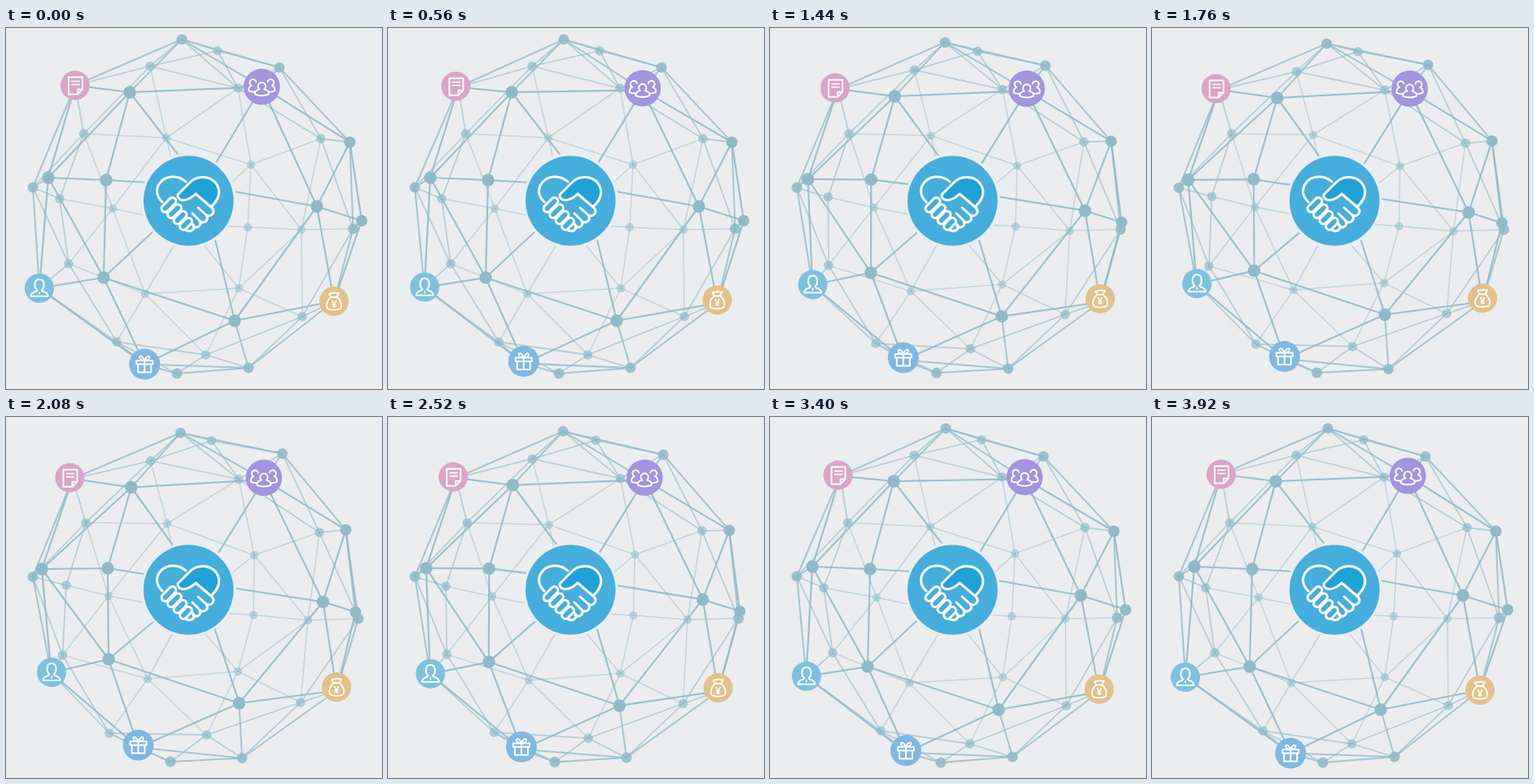
These frames come from a looping animation (462 px wide and 444 px high, 3960 ms). An HTML page with a canvas:

```html
<!DOCTYPE html>
<html lang="en">
<head>
<meta charset="utf-8">
<title>Connected globe</title>
<style>
  html, body { margin: 0; width: 100%; height: 100%; overflow: hidden; background: #ebedef; }
  canvas { display: block; width: 462px; height: 444px; }
</style>
</head>
<body>
<canvas id="stage"></canvas>
<script>
const W = 462, H = 444, STEP = 40, LOOP = 3960;
const BG = '#ebedef', NET = '#8fbac7';
const canvas = document.getElementById('stage');
const ctx = canvas.getContext('2d');
const dpr = window.devicePixelRatio || 1;
canvas.width = W * dpr;
canvas.height = H * dpr;

// Each node: x, y, dx, dy. Layers run from the far side to the near side.
const layers = [
  { depth: .52, r: 5.2, nodes: {
    H: [197, 135, 1, -4], I: [301, 168, 4, 2], P: [131, 222, -5, -2], Q: [297, 245, 7, -1.5],
    R: [363, 248, 8, 2], X: [171, 327, 3, -5], Y: [286, 320, -1, -7], g: [222, 241, -2, -3] } },
  { depth: .68, r: 5.8, nodes: {
    B: [260, 28, -7.5, 1], D: [177, 47, .5, 7], E: [285, 74, 1, 2.5], G: [95.5, 130, 2.5, 0],
    J: [387, 136, -2, 6], O: [66, 210, 8, -3], V: [77, 290, -7.5, 3], a: [364, 355, -2, -4],
    b: [136, 386, -9, 3], c: [245.5, 402, 1, -11] } },
  { depth: .88, r: 6.5, nodes: {
    A: [216, 14, -1.5, 5.5], C: [336, 48.5, 3.5, -3.5], M: [33, 196, 0, .5], U: [426.5, 247, 6.5, 1],
    d: [210, 425, -8, -1], e: [298, 418, -8, 1.5] } },
  { depth: 1, r: 7.7, nodes: {
    F: [152, 79, 2, 7.5], L: [52, 184, -8, 3], N: [123, 187, 2, -1], S: [382, 219.5, 7.5, 7.8],
    W: [120, 307, 6, -9], Z: [281, 360, 5.5, -8], K: [422.5, 140.5, -5, -1.7], T: [437, 237, -7.5, 3],
    h: [241, 194, -3, 10] } }
];
const small = { K: 7, T: 7 };

const edges = (
  'HD HE HI HG HP Hg Ig Pg Qg Xg Yg IE IJ IQ IR RQ RY RU RJ Ra YQ YX Ya Yc Xc Xb XV XP PV PO PG ' +
  'GO GD GM G1 D1 DA DB DE AE BE AB BC EC EJ CJ JK JU OV OM VM Vb V3 bc bd b4 b3 cd ca ce ae Ua a5 ' +
  'AC A1 A2 AF C2 CK M1 M3 ML UK UT U5 de d4 e4 e5 eZ ' +
  'F1 F2 FL FN Fh L1 LN LW L3 NW Nh 2h 2K 2S KS KT ST SZ S5 Sh T5 W3 W4 WZ Wh Z4 Z5 Zh 34'
).split(' ');

// Icons: rest, turning point and end position; shift is how far they drift off their joint.
const icons = {
  1: { r: 18, color: '#dba4c8', path: [[85, 70.5], [83.2, 71.8], [78, 75]], shift: [3.4, 1.3], draw: drawNote },
  2: { r: 22.3, color: '#a294de', path: [[314.3, 72.3], [312.6, 74.4], [317.3, 74.7]], shift: [0, 2.5], draw: drawPeople },
  3: { r: 18, color: '#7dc1e0', path: [[41, 320], [45.7, 318.5], [57, 313.6]], shift: [-.5, .5], draw: drawPerson },
  4: { r: 19, color: '#7fb8e2', path: [[170.3, 413.5], [166.2, 409.5], [162.2, 403]], shift: [.5, 3], draw: drawGift },
  5: { r: 18, color: '#e3c08a', path: [[403, 336], [404.8, 334.4], [406.3, 332]], shift: [0, 4.3], draw: drawBag }
};

const depthOf = {};
layers.forEach(l => Object.keys(l.nodes).forEach(k => depthOf[k] = l.depth));
Object.keys(icons).forEach(k => depthOf[k] = 1);
const edgeDepth = e => Math.min(depthOf[e[0]], depthOf[e[1]]);
edges.sort((p, q) => edgeDepth(p) - edgeDepth(q));

const mix = (p, q, k) => [p[0] + (q[0] - p[0]) * k, p[1] + (q[1] - p[1]) * k];

function disc(x, y, r, color) {
  ctx.fillStyle = color;
  ctx.beginPath();
  ctx.arc(x, y, r, 0, 7);
  ctx.fill();
}

function stroke(d, width = 1.7, color = '#fff') {
  ctx.lineWidth = width;
  ctx.strokeStyle = color;
  ctx.stroke(new Path2D(d));
}

function fill(d, color) {
  ctx.fillStyle = color;
  ctx.fill(new Path2D(d));
}

function drawNote() {
  stroke('M-8-10H9V5L3 11H-8ZM9 5H3V11', 2);
  stroke('M-4-5H5M-4-1H5', 1.7);
}

function drawPeople(color) {
  const side = 'M-7-6A4 4 0 1 0-12.5-1.5C-15.5-.5-16.5 2-16 5C-13.5 6.5-11 6.5-8 6';
  stroke(side, 1.9);
  ctx.save();
  ctx.scale(-1, 1);
  stroke(side, 1.9);
  ctx.restore();
  const body = 'M-3 3C-7 4-9 6-8.5 9C-4 11.5 4 11.5 8.5 9C9 6 7 4 3 3A4.7 4.7 0 1 0-3 3Z';
  fill(body, color);
  stroke(body, 1.9);
}

function drawPerson() {
  stroke('M-2.8 2.5C-7-1-6.5-11 0-11C6.5-11 7-1 2.8 2.5C2.5 5 10.5 3.5 10.5 10H-10.5C-10.5 3.5-2.5 5-2.8 2.5Z', 2);
  stroke('M0 5V7', 1.6);
}

function drawGift() {
  stroke('M-10-4.5H10V0H-10ZM-8 0V10H8V0M0-4.5V10', 2);
  stroke('M0-5C-3-11-7-11-6-7.5C-5-5-3-5 0-5C3-5 5-5 6-7.5C7-11 3-11 0-5', 1.8);
}

function drawBag() {
  stroke('M-3.5-5C-8-2-10 4-8.5 8C-7 11.5 7 11.5 8.5 8C10 4 8-2 3.5-5ZM-3.5-5L-6-9C-4-11-2-9-1-10C1-12 2-9 6-10L3.5-5', 1.8);
  ctx.fillStyle = '#fff';
  ctx.font = 'bold 12px "Liberation Sans", Arial, sans-serif';
  ctx.textAlign = 'center';
  ctx.fillText('¥', 0, 7.5);
}

function drawHub() {
  const blue = '#45aedc';
  disc(224.3, 212.5, 58.5, BG);
  disc(224.3, 212.5, 55.3, blue);
  fill('M225 191C234 181 250 181 258 191C265 201 261 211 253 219L234 203C228 210 219 214 213 208C211 205 216 199 225 191Z', '#20a2d7');
  stroke('M192 214C185 207 184 199 188 192C195 181 211 180 221 189', 3);
  stroke('M253 219C261 211 265 201 258 191C250 181 234 181 225 191L211 205C210 213 222 215 233 204L253 221C258 227 252 233 246 230', 3);
  stroke('M236 221L246 230C250 236 244 241 238 238M229 228L238 237C241 243 235 247 230 244M223 235L231 243C232 248 227 251 222 249L218 246', 3);
  for (let i = 0; i < 4; i++) {
    const x = 195.5 + i * 7.5, y = 222 + i * 7.3;
    const len = 9 - i;
    const finger = `M${x} ${y}L${x + len} ${y - len}`;
    stroke(finger, 11.8);
    stroke(finger, 5.8, blue);
  }
}

function draw(step) {
  const f = Math.min(step, 98 - step);
  const turn = Math.max(0, f - 16) / 30;
  const drift = Math.min(1, f / 16);
  const pos = {}, spot = {};
  for (const { nodes } of layers)
    for (const k in nodes) {
      const [x, y, dx, dy] = nodes[k];
      pos[k] = [x + dx * turn, y + dy * turn];
    }
  for (const k in icons) {
    const { path: [p, q, s], shift } = icons[k];
    spot[k] = f < 16 ? mix(p, q, f / 16) : mix(q, s, (f - 16) / 33);
    pos[k] = [spot[k][0] + shift[0] * drift, spot[k][1] + shift[1] * drift];
  }

  ctx.setTransform(dpr, 0, 0, dpr, 0, 0);
  ctx.fillStyle = BG;
  ctx.fillRect(0, 0, W, H);
  ctx.lineCap = ctx.lineJoin = 'round';

  for (const e of edges) {
    const depth = edgeDepth(e);
    ctx.globalAlpha = depth * .86;
    ctx.strokeStyle = NET;
    ctx.lineWidth = .9 + 1.3 * depth;
    ctx.beginPath();
    ctx.moveTo(...pos[e[0]]);
    ctx.lineTo(...pos[e[1]]);
    ctx.stroke();
  }

  for (const { nodes, r, depth } of layers) {
    ctx.globalAlpha = depth;
    for (const k in nodes) disc(...pos[k], small[k] || r, NET);
  }
  ctx.globalAlpha = 1;

  for (const k in icons) {
    const { r, color, draw: glyph } = icons[k];
    ctx.save();
    ctx.translate(...spot[k]);
    disc(0, 0, r, color);
    glyph(color);
    ctx.restore();
  }
  drawHub();
}

const start = performance.now();
function tick() {
  draw(Math.floor((performance.now() - start) % LOOP / STEP));
  requestAnimationFrame(tick);
}
tick();
</script>
</body>
</html>
```
